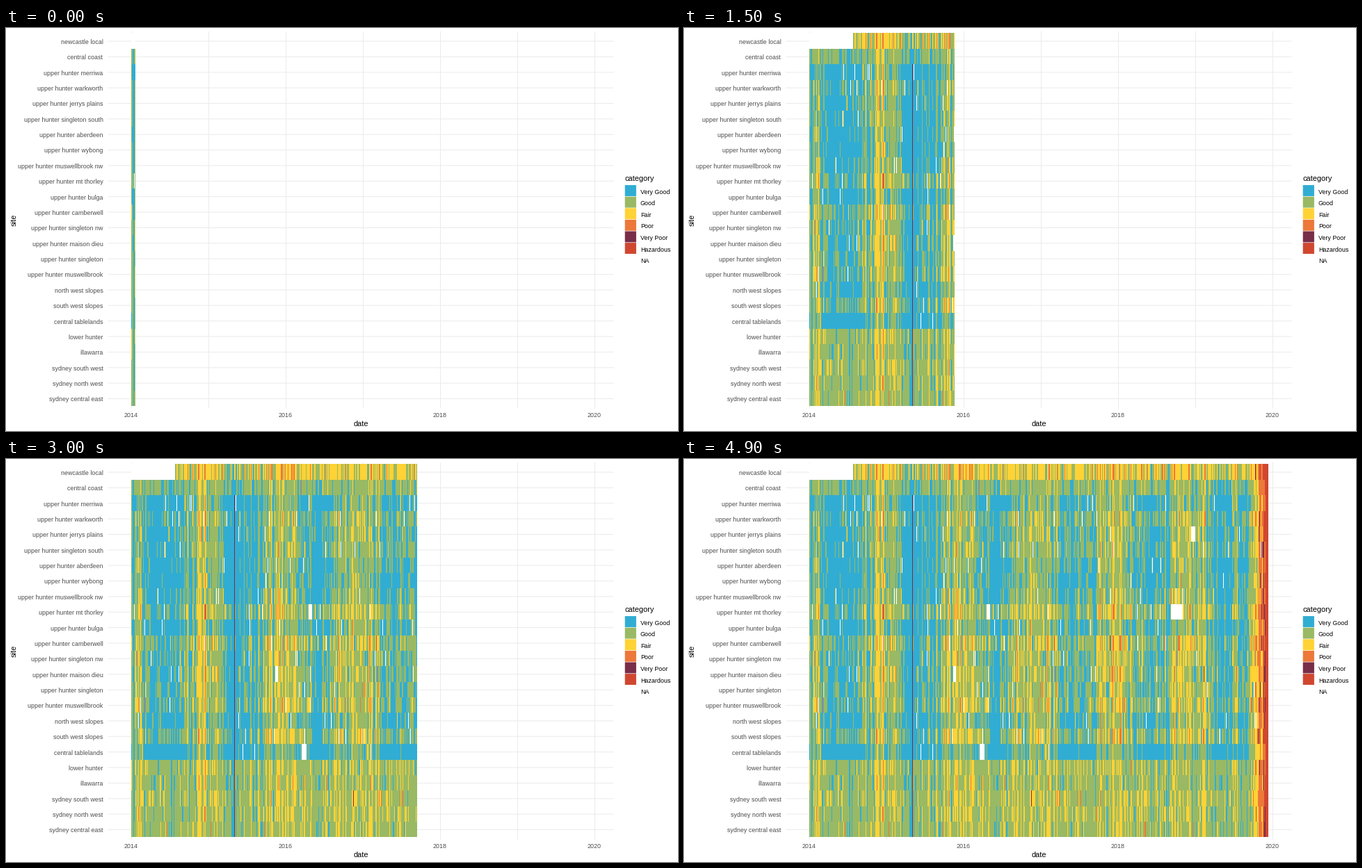
These frames come from a looping animation (966x580 px, 10 s). A matplotlib script:

```python
import numpy as np
import matplotlib.pyplot as plt
from matplotlib.animation import FuncAnimation
from matplotlib.patches import Rectangle

W, H, DPI = 966, 580, 100
X0, X1, TOP, BOTTOM = 180, 840, 7, 544
N = X1 - X0
STEP = 22.37      # row height
FIRST = 18.7      # centre of the top row
YEAR = 111        # pixels per year
plt.rcParams["font.family"] = "Liberation Sans"

CATEGORIES = {"Very Good": "#31add3", "Good": "#99b964", "Fair": "#ffd236",
              "Poor": "#ec783a", "Very Poor": "#782d49", "Hazardous": "#d04730",
              "NA": "#ffffff"}
LIMITS = [1, 2, 3, 4, 4.2]
VERY_POOR, NA = 4, 6

# mean pollution level of each site
SITES = {
    "newcastle local": 2.2, "central coast": 1.4,
    "upper hunter merriwa": 0.85, "upper hunter warkworth": 1.3,
    "upper hunter jerrys plains": 1.1, "upper hunter singleton south": 1.15,
    "upper hunter aberdeen": 1.0, "upper hunter wybong": 0.95,
    "upper hunter muswellbrook nw": 1.15, "upper hunter mt thorley": 1.5,
    "upper hunter bulga": 1.0, "upper hunter camberwell": 1.6,
    "upper hunter singleton nw": 1.35, "upper hunter maison dieu": 1.4,
    "upper hunter singleton": 1.3, "upper hunter muswellbrook": 1.5,
    "north west slopes": 1.0, "south west slopes": 1.5,
    "central tablelands": 0.75, "lower hunter": 1.65, "illawarra": 1.55,
    "sydney south west": 1.75, "sydney north west": 1.7, "sydney central east": 1.65,
}
NAMES = list(SITES)
ROWS = len(NAMES)

# long outages: site, left, width
GAPS = [
    ("newcastle local", 180, 63), ("upper hunter jerrys plains", 729, 6),
    ("upper hunter mt thorley", 435, 5), ("upper hunter mt thorley", 700, 17),
    ("upper hunter maison dieu", 387, 4), ("central tablelands", 425, 7),
]


def noise(rng, rows):
    w = rng.normal(size=(rows, N))
    return (w + 0.6 * np.roll(w, 1, axis=1)) / 1.17


def bump(x, centre, width):
    return np.exp(-((x - centre) / width) ** 2)


def make_categories():
    rng = np.random.default_rng(14)
    x = np.arange(X0, X1)
    t = (x - X0) / YEAR
    season = 0.6 * np.cos(2 * np.pi * (t - 0.92)) + 0.08 * (t - 3)
    base = np.array(list(SITES.values()))[:, None]
    inland = np.array([n.startswith(("upper", "north", "south", "central tab"))
                       for n in NAMES])[:, None]
    spread = 0.4 * base + np.where(inland, 0.4, 0.05)

    level = base + np.where(inland, 1, 0.3) * season
    level = level + spread * (0.5 * noise(rng, 1) + 0.4 * noise(rng, ROWS))
    level += (rng.random((ROWS, N)) < 0.015) * rng.uniform(0.5, 1.6, (ROWS, N))

    # a wet spell, two smoky days, then the final bushfires
    level += bump(x, 277, 2) + bump(x, 286, 1) - 0.6 * bump(x, 324, 6)
    level += 2.2 * np.clip((x - 816) / 20, 0, 1) + 1.2 * (x > 835)

    cat = np.digitize(level, LIMITS)
    cat[2:, 328 - X0] = VERY_POOR      # dust storm
    cat[inland & (rng.random((ROWS, N)) < 0.01)] = NA
    for name, left, width in GAPS:
        cat[NAMES.index(name), left - X0:left - X0 + width] = NA
    return cat


def make_tiles():
    rgb = np.array([[int(c[i:i + 2], 16) for i in (1, 3, 5)]
                    for c in CATEGORIES.values()])
    row = (np.arange(BOTTOM - TOP) / STEP).clip(0, ROWS - 1).astype(int)
    tiles = np.full((BOTTOM - TOP, N, 4), 255, dtype=np.uint8)
    tiles[..., :3] = rgb[make_categories()[row]]
    return tiles


fig = plt.figure(figsize=(W / DPI, H / DPI), dpi=DPI, facecolor="white")
ax = fig.add_axes([0, 0, 1, 1])
ax.axis("off")


def label(x, y, text, px=8.9, color="black", **kw):
    ax.text(x, y, text, fontsize=px * 72 / DPI, color=color, **kw)


def grid(xs, ys):
    ax.plot(xs, ys, color="#ebebeb", lw=72 / DPI, snap=False, zorder=1)


for i, name in enumerate(NAMES):
    y = FIRST + STEP * i
    grid([147, 873], [y + 0.3] * 2)
    label(139.5, y + 4.2, name, color="#4d4d4d", ha="right")

for i in range(7):
    x = X0 + YEAR * i
    grid([x + 0.5] * 2, [5.3, 547])
    if i % 2 == 0:
        label(x, 560.5, str(2014 + i), color="#4d4d4d", ha="center")

label(510, 573, "date", 11, ha="center")
label(12, 276, "site", 11, rotation=90, ha="center", va="center")

label(890, 219.7, "category", 11)
for i, (name, color) in enumerate(CATEGORIES.items()):
    y = 226.1 + 16.6 * i
    ax.add_patch(Rectangle((889.7, y), 16.2, 15.9, fc=color, lw=0, snap=False))
    label(912, y + 12.6, name)

tiles = make_tiles()
image = ax.imshow(tiles, extent=(X0, X1, BOTTOM, TOP), interpolation="nearest",
                  aspect="auto", zorder=2)
ax.set_xlim(0, W)
ax.set_ylim(H, 0)


def update(frame):
    edge = min(int(186.5 + 13.5 * frame), X1)
    shown = tiles.copy()
    shown[:, edge - X0:, 3] = 0
    image.set_data(shown)
    return [image]


anim = FuncAnimation(fig, update, frames=100, interval=100, repeat=True, repeat_delay=0)
plt.show()
```
